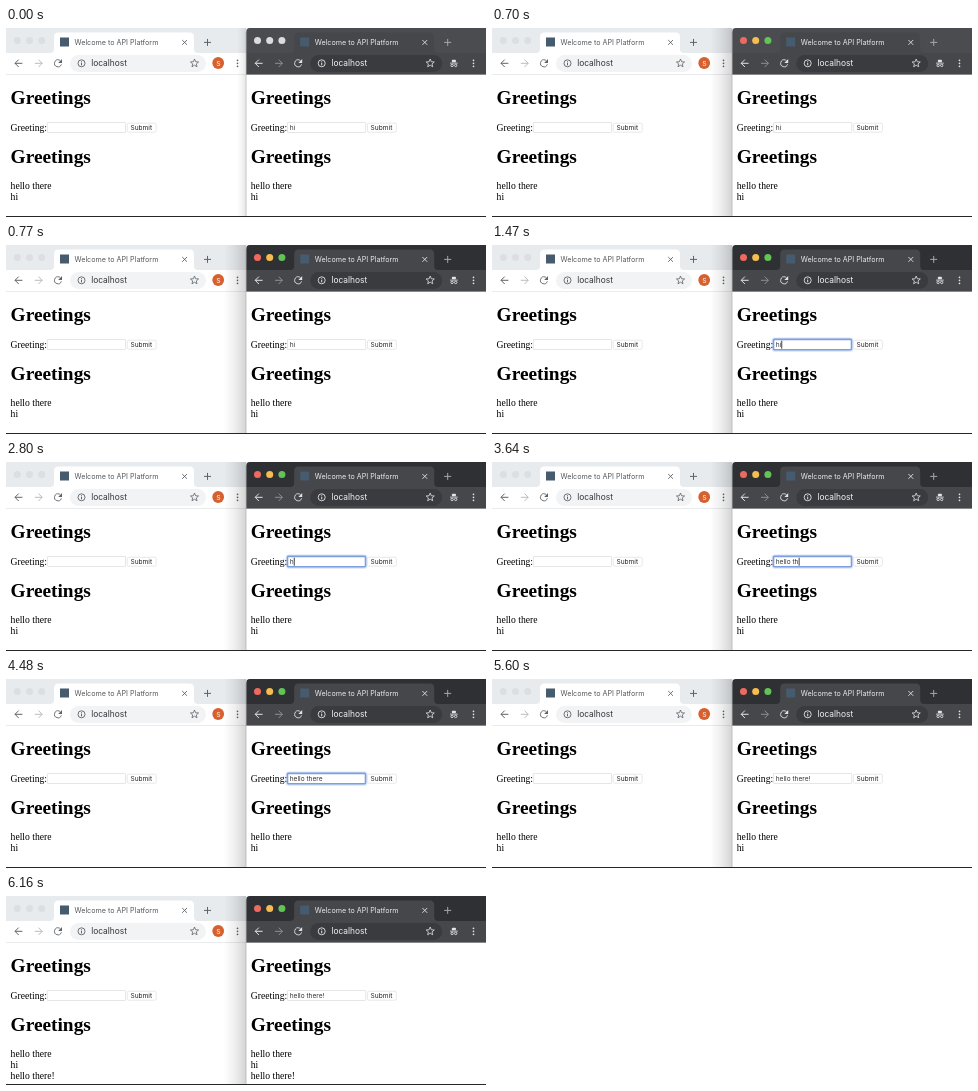
Write an HTML page with a canvas that moves like this. It is 480x189 px and loops after 7280 ms.

```html
<!DOCTYPE html>
<html lang="en">
<head>
<meta charset="utf-8">
<title>Greetings</title>
<style>
  html, body { margin: 0; width: 100%; height: 100%; overflow: hidden; background: #fff; }
  canvas { display: block; width: 480px; height: 189px; }
</style>
</head>
<body>
<canvas id="stage" width="480" height="189"></canvas>
<script>
const ctx = document.getElementById('stage').getContext('2d');
const LOOP = 7280;
const UI = 'Inter, "Open Sans", sans-serif';
const SERIF = '"Liberation Serif", "Times New Roman", serif';
const CONTROL = '6.6px ' + UI;
const BODY = '9.65px ' + SERIF;
const HEADING = 'bold 19.35px ' + SERIF;
const LEFT = 4.6;

// Start time and value of the text field
const TYPING = [
  [0, 'hi'], [2660, 'h'], [2730, ''], [2800, 'h'], [3010, 'he'],
  [3150, 'hel'], [3220, 'hell'], [3360, 'hello'], [3500, 'hello '],
  [3570, 'hello t'], [3640, 'hello th'], [3780, 'hello ther'],
  [3920, 'hello there'], [4550, 'hello there!']
];
const LIGHT = {
  strip: '#e8ebee', bar: '#ffffff', pill: '#f1f3f4', edge: '#dcdee0',
  title: '#55585c', url: '#33363a', icon: '#5f6368', faint: '#babcbe', plus: '#5f6368',
  lights: ['#dcdee1', '#dcdee1', '#dcdee1']
};
const DARK = {
  strip: '#2f3034', bar: '#45474b', pill: '#393b3f', edge: '#3a3b3f',
  title: '#e8eaed', url: '#f1f3f4', icon: '#e3e4e6', faint: '#8e8f93', plus: '#a6a7aa',
  lights: ['#ee6a5f', '#f5bd4f', '#61c454']
};
const WAKING = { ...DARK, strip: '#4b4c50' };
const DIMMED = { ...WAKING, lights: ['#dcdcde', '#dcdcde', '#dcdcde'] };

const within = (t, from, to) => t >= from && t < to;

function rect(x, y, w, h, color) {
  ctx.fillStyle = color;
  ctx.fillRect(x, y, w, h);
}

function rounded(x, y, w, h, r, fill, stroke, width = 1) {
  ctx.beginPath();
  ctx.roundRect(x, y, w, h, r);
  if (fill) { ctx.fillStyle = fill; ctx.fill(); }
  if (stroke) { ctx.strokeStyle = stroke; ctx.lineWidth = width; ctx.stroke(); }
}

function disc(x, y, r, color) {
  ctx.beginPath();
  ctx.arc(x, y, r, 0, Math.PI * 2);
  ctx.fillStyle = color;
  ctx.fill();
}

function ring(x, y, r, color, from = 0, to = Math.PI * 2) {
  ctx.beginPath();
  ctx.arc(x, y, r, from, to);
  ctx.strokeStyle = color;
  ctx.lineWidth = 0.9;
  ctx.stroke();
}

function line(points, color, width = 1, close = false) {
  ctx.beginPath();
  points.forEach(([x, y]) => ctx.lineTo(x, y));
  if (close) ctx.closePath();
  ctx.strokeStyle = color;
  ctx.lineWidth = width;
  ctx.stroke();
}

function text(str, x, y, font, color = '#000') {
  ctx.font = font;
  ctx.fillStyle = color;
  ctx.fillText(str, x, y);
}

function arrow(x, y, dir, color) {
  line([[x - 3.7 * dir, y], [x + 3.7 * dir, y]], color);
  line([[x, y - 3.7], [x + 3.7 * dir, y], [x, y + 3.7]], color);
}

function reload(x, y, color) {
  ring(x, y, 3.5, color, 0.3, 5.4);
  ctx.beginPath();
  ctx.moveTo(x + 4, y - 4.2);
  ctx.lineTo(x + 4, y - 0.4);
  ctx.lineTo(x + 0.2, y - 0.4);
  ctx.fillStyle = color;
  ctx.fill();
}

function info(x, y, color) {
  ring(x, y, 3.5, color);
  rect(x - 0.5, y - 0.5, 1, 2.5, color);
  rect(x - 0.5, y - 2, 1, 0.9, color);
}

function star(x, y, color) {
  const points = Array.from({ length: 10 }, (_, i) => {
    const a = i * Math.PI / 5 - Math.PI / 2, r = i % 2 ? 1.9 : 4.3;
    return [x + r * Math.cos(a), y + r * Math.sin(a)];
  });
  line(points, color, 0.8, true);
}

function agent(x, y, color) {
  rounded(x - 2, y - 3.6, 4, 2.6, 0.9, color);
  rect(x - 3.9, y - 0.6, 7.8, 0.8, color);
  for (const side of [-1.8, 1.8]) ring(x + side, y + 2.1, 1.2, color);
}

function tab(color) {
  ctx.beginPath();
  ctx.moveTo(44, 25);
  ctx.quadraticCurveTo(48, 25, 48, 21);
  ctx.lineTo(48, 9);
  ctx.quadraticCurveTo(48, 4.5, 52.5, 4.5);
  ctx.lineTo(183.5, 4.5);
  ctx.quadraticCurveTo(188, 4.5, 188, 9);
  ctx.lineTo(188, 21);
  ctx.quadraticCurveTo(188, 25, 192, 25);
  ctx.fillStyle = color;
  ctx.fill();
}

function chrome(c, isPrivate) {
  rect(0, 0, 241, 25, c.strip);
  rect(0, 25, 241, 21, c.bar);
  rect(0, 46, 241, 0.6, c.edge);
  tab(c.bar);
  c.lights.forEach((color, i) => disc(11.3 + i * 12.2, 12.4, 3.5, color));
  rect(54, 9.5, 9, 9, '#465b6e');
  text('Welcome to API Platform', 68.5, 16.8, '7.18px ' + UI, c.title);
  line([[176.2, 12], [181, 16.8]], c.icon, 0.9);
  line([[181, 12], [176.2, 16.8]], c.icon, 0.9);
  line([[198, 14.4], [205, 14.4]], c.plus);
  line([[201.5, 10.9], [201.5, 17.9]], c.plus);

  arrow(12.7, 35.3, -1, c.icon);
  arrow(32.5, 35.3, 1, c.faint);
  reload(52, 35.3, c.icon);
  rounded(64, 27, isPrivate ? 132 : 136, 17, 8.5, c.pill);
  info(75.5, 35.3, c.icon);
  text('localhost', 85.2, 38.3, '8.4px ' + UI, c.url);
  star(isPrivate ? 184 : 188.5, 35.3, c.icon);
  if (isPrivate) {
    agent(207.7, 35.3, c.icon);
  } else {
    disc(212.2, 35, 5.9, '#d7602f');
    text('S', 210.2, 37.5, '6.8px ' + UI, '#fff');
  }
  const dots = isPrivate ? 227.3 : 231.5;
  for (const dy of [-3, 0, 3]) disc(dots, 35.3 + dy, 0.85, c.icon);
}

function field(value, focused, caret) {
  if (focused) {
    rounded(40.9, 94, 78.8, 11.2, 1.5, '#fff', 'rgba(110,150,225,.25)', 3);
    rounded(41.3, 94.4, 78, 10.4, 1, '#fff', '#7d9fe0', 1.6);
  } else {
    rounded(41.3, 94.5, 78.2, 10, 0.5, '#fff', '#e0e0e0', 0.8);
  }
  text(value, 43.5, 102.4, CONTROL, '#333');
  if (caret) rect(43.7 + ctx.measureText(value).width, 95.7, 0.8, 8, '#111');
}

function page(value, focused, caret, hasReply) {
  text('Greetings', LEFT, 75.8, HEADING);
  field(value, focused, caret);
  text('Greeting:', LEFT, 102.6, BODY);
  rounded(121.2, 95.2, 29, 9, 1.5, '#fff', '#e2e2e2', 0.8);
  text('Submit', 124.4, 102.4, CONTROL, '#222');
  text('Greetings', LEFT, 134.8, HEADING);
  const lines = ['hello there', 'hi'];
  if (hasReply) lines.push('hello there!');
  lines.forEach((s, i) => text(s, LEFT, 161.2 + i * 10.8, BODY));
}

function shadow(width, alpha) {
  const g = ctx.createLinearGradient(240 - width, 0, 240, 0);
  g.addColorStop(0, 'rgba(0,0,0,0)');
  g.addColorStop(0.5, `rgba(0,0,0,${alpha * 0.4})`);
  g.addColorStop(1, `rgba(0,0,0,${alpha})`);
  rect(240 - width, 0, width, 189, g);
}

function draw(t) {
  const active = t >= 700;
  const theme = t < 700 ? DIMMED : t < 770 ? WAKING : DARK;
  const value = TYPING.filter(([start]) => t >= start).pop()[1];
  const focused = within(t, 1470, 5600);
  const caret = focused && !within(t, 4480, 4550) && t < 5040;
  const hasReply = t >= 6160;

  rect(0, 0, 480, 189, '#fff');
  chrome(LIGHT, false);
  page('', false, false, hasReply);
  shadow(active ? 22 : 9, active ? 0.17 : 0.1);

  ctx.save();
  ctx.translate(240.2, 0);
  ctx.beginPath();
  ctx.roundRect(0, 0, 250, 200, 3.5);
  ctx.clip();
  rect(0, 0, 250, 200, '#fff');
  chrome(theme, true);
  page(value, focused, caret, hasReply);
  ctx.restore();
  rect(239.8, 4, 0.6, 185, 'rgba(0,0,0,.3)');
  rect(0, 188, 480, 1, '#262626');
}

const begin = performance.now();
function tick() {
  draw((performance.now() - begin) % LOOP);
  requestAnimationFrame(tick);
}
tick();
</script>
</body>
</html>
```
